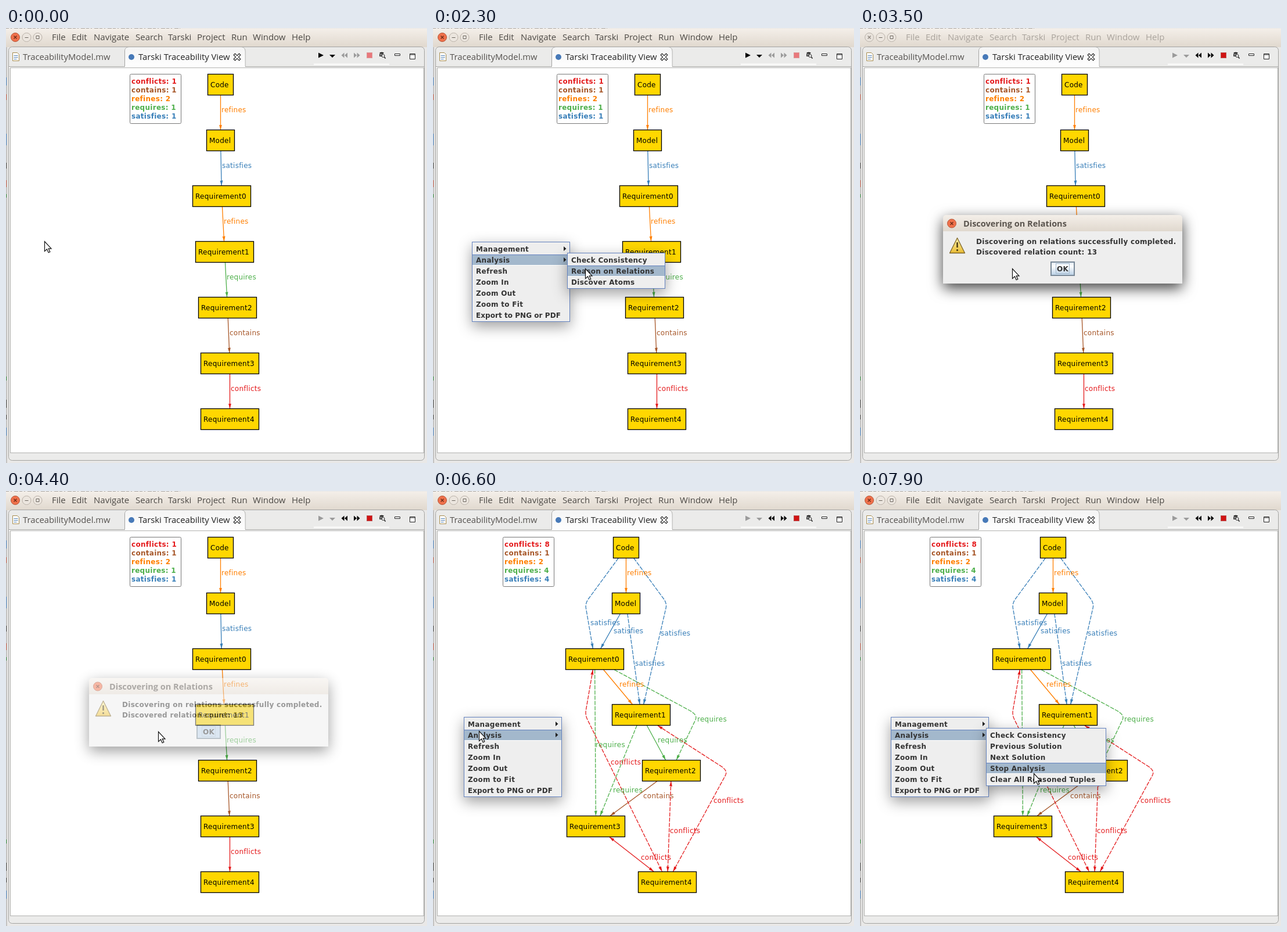
Animation, 725 px wide and 749 px high, one loop 8 s. Source, as an HTML page:

```html
<!DOCTYPE html>
<html lang="en">
<head>
<meta charset="utf-8">
<title>Traceability view</title>
<style>
html, body { margin: 0; width: 100%; height: 100%; overflow: hidden; background: #e9e8e7; }
svg { display: block; width: 725px; height: 749px; }
text { white-space: pre; }
.ui { font: 15px "Open Sans", sans-serif; fill: #4c4945; }
.tab { font: 14.8px "Open Sans", sans-serif; }
.title { font: bold 14.5px "Open Sans", sans-serif; fill: #5a544e; }
.label { font: 12px "DejaVu Sans", sans-serif; letter-spacing: .25px; }
.bold { font: bold 12px "DejaVu Sans", sans-serif; letter-spacing: .28px; fill: #333; }
.node { fill: #ffd700; stroke: #000; stroke-width: 1.3; }
.edge { fill: none; stroke-width: 1.3; stroke-linecap: round; }
.dash { stroke-dasharray: 6 3; }
.float { filter: drop-shadow(0 8px 12px rgba(0, 0, 0, .38)); }
.dialog { filter: drop-shadow(0 8px 12px rgba(0, 0, 0, .75)); }
.crisp { shape-rendering: crispEdges; }
.blur .ui { fill: #a9a39c; }
.blur .close { fill: #e9e3dc; stroke: #bab3ab; }
.blur .cross { stroke: #8c857d; }
.close { fill: #f0714b; stroke: #b5583c; }
.cross { stroke: #6b2b18; stroke-width: 1.3; }
.round { fill: #ece6df; stroke: #b9b1a8; }
.idle, .busy .live { fill: #9b9b9b; }
.live, .busy .idle { fill: #000; }
.stop { fill: #e8787c; stroke: #d99; }
.busy .stop { fill: #d01313; stroke: #b55; }
</style>
</head>
<body>
<svg id="stage" viewBox="0 0 725 749">
  <defs id="defs">
    <linearGradient id="bar" x2="0" y2="1"><stop stop-color="#f4efe9"/><stop offset="1" stop-color="#e0d8ce"/></linearGradient>
    <linearGradient id="item" x2="0" y2="1"><stop stop-color="#f4f4f4"/><stop offset="1" stop-color="#fff"/></linearGradient>
    <linearGradient id="metal" x2="0" y2="1"><stop stop-color="#dde8f3"/><stop offset=".3" stop-color="#fff"/><stop offset="1" stop-color="#b8cfe5"/></linearGradient>
    <linearGradient id="gold" x2="0" y2="1"><stop stop-color="#fff3a8"/><stop offset="1" stop-color="#e9bb33"/></linearGradient>
  </defs>

  <g id="frame">
    <path d="M0 .5H300" stroke="#a9a6a3" stroke-dasharray="5 3 2 4 7 2"/>
    <rect y="1" width="725" height="32" fill="url(#bar)"/>
    <circle class="close" cx="16" cy="16" r="7.5"/>
    <path class="cross" d="M13.5 13.5l5 5m0-5l-5 5"/>
    <circle class="round" cx="35.5" cy="16" r="7.5"/>
    <circle class="round" cx="54.5" cy="16" r="7.5"/>
    <path d="M32.5 16.5h6M52 13.5h5v5h-5z" fill="none" stroke="#69635c"/>
    <g id="menubar"></g>
  </g>

  <rect x="4.5" y="32.5" width="716" height="712" rx="6" fill="#ebebea" stroke="#a3a3a1"/>
  <path d="M5 66.5H204.5V40q0-7 7-7H405q7 0 7 7V66.5H720" fill="none" stroke="#a3a3a1"/>
  <path d="M205 69V40q0-7 7-7H405q6.5 0 6.5 7V69z" fill="url(#item)"/>
  <rect x="5" y="67" width="715" height="2" fill="#fff"/>
  <rect class="crisp" x="7.5" y="68.5" width="712" height="663" fill="#fff" stroke="#b1b1af"/>
  <path d="M530 62.5H660" stroke="#fff" stroke-width="2"/>
  <g class="crisp">
    <path d="M0 33V749" stroke="#c4c3c2" stroke-width="3"/>
    <path d="M.5 85v14M.5 182v20M.5 688v14" stroke="#5a94d0"/>
    <path d="M.5 114v10M.5 262v12" stroke="#d06a58"/>
    <path d="M.5 286v6M.5 600v7" stroke="#3f9b4c"/>
    <path d="M.5 232v10M.5 640v14M.5 666v8" stroke="#555"/>
  </g>

  <path d="M11.5 42.5h8l3 3v11h-11z" fill="#fff" stroke="#a58b4d"/>
  <path d="M13.5 47.5h7m-7 3h7m-7 3h5" stroke="#4f7fb5"/>
  <circle cx="216" cy="50" r="5" fill="#4779b8"/>
  <text class="tab" x="29" y="55" fill="#55524f">TraceabilityModel.mw</text>
  <text class="tab" x="228" y="55" fill="#222">Tarski Traceability View</text>
  <path d="M394.5 46.5l7 7m0-7l-7 7" stroke="#222" stroke-width="4.5" stroke-linecap="square"/>
  <path d="M394.5 46.5l7 7m0-7l-7 7" stroke="#fff" stroke-width="2.2" stroke-linecap="square"/>

  <g id="tools">
    <path class="live" d="M538 42.5l9 4.5-9 4.5zM557 46h10l-5 5z"/>
    <path class="idle" d="M582.5 42.5v9l-5-4.5zM588 42.5v9l-5-4.5zM599 42.5v9l5-4.5zM604.5 42.5v9l5-4.5z"/>
    <rect class="stop" x="621.5" y="42.5" width="9" height="9"/>
    <ellipse cx="647" cy="43" rx="3.5" ry="1.5" fill="#222"/>
    <path d="M643.5 44.5v4h5v-4" fill="#777" stroke="#333"/>
    <circle cx="649.5" cy="48" r="2.5" fill="#eee" stroke="#222"/>
    <path d="M651.5 50l2 2.5" stroke="#222" stroke-width="1.5"/>
    <path d="M669.5 44.5h9v3h-9zM695.5 44.5h9v9h-9zM695.5 46h9" fill="#fff" stroke="#222"/>
  </g>

  <g id="before"></g>
  <g id="after"></g>
  <g id="menus"></g>

  <g id="dialog">
    <path class="dialog" d="M143 440V328q0-6 6-6H549q6 0 6 6V440z" fill="#eee"/>
    <path d="M143 350V328q0-6 6-6H549q6 0 6 6v22z" fill="url(#bar)"/>
    <circle class="close" cx="158" cy="336.5" r="7.5"/>
    <path class="cross" d="M155.5 334l5 5m0-5l-5 5"/>
    <text class="title" x="178" y="342">Discovering on Relations</text>
    <path d="M167.5 361.5l13 26h-26z" fill="url(#gold)" stroke="#7d6428" stroke-width="1.3" stroke-linejoin="round"/>
    <path d="M167.5 369v9m0 3v3" stroke="#4a3a12" stroke-width="2.5"/>
    <text class="bold" x="200" y="372">Discovering on relations successfully completed.</text>
    <text class="bold" x="200" y="390">Discovered relation count: 13</text>
    <rect x="329" y="403" width="40" height="23" fill="url(#metal)" stroke="#7a8a99" stroke-width="2"/>
    <rect id="press" x="330" y="404" width="38" height="21" fill="#b8cfe5"/>
    <rect class="crisp" x="337.5" y="405.5" width="23" height="17" fill="none" stroke="#a3b8cc"/>
    <text class="bold" x="339" y="419">OK</text>
  </g>

  <path id="cursor" d="M.5.5V17.5L4.5 13.8 7.2 19.7 9.8 18.5 7.2 12.8H12z" fill="#fff" stroke="#111" stroke-width="1.2"/>
</svg>

<script>
const $ = id => document.getElementById(id);

function add(parent, tag, attrs, text) {
  const el = document.createElementNS('http://www.w3.org/2000/svg', tag);
  for (const k in attrs) el.setAttribute(k, attrs[k]);
  if (text) el.textContent = text;
  return parent.appendChild(el);
}
const show = (el, on) => { el.style.display = on ? '' : 'none'; };

const colors = {
  conflicts: '#e41a1c', contains: '#a65628', refines: '#ff7f00',
  requires: '#4daf4a', satisfies: '#377eb8'
};
for (const kind in colors) {
  const m = add($('defs'), 'marker', {
    id: kind, markerUnits: 'userSpaceOnUse', markerWidth: 9, markerHeight: 6,
    refX: 8.5, refY: 3, orient: 'auto-start-reverse'
  });
  add(m, 'path', { d: 'M0 .5L9 3 0 5.5z', fill: colors[kind] });
}

[['File', 79], ['Edit', 113], ['Navigate', 151], ['Search', 223], ['Tarski', 279],
 ['Project', 329], ['Run', 388], ['Window', 425], ['Help', 492]]
  .forEach(([name, x]) => add($('menubar'), 'text', { class: 'ui', x, y: 21 }, name));

// Nodes sit in rows 96px apart
const names = ['Code', 'Model', ...[0, 1, 2, 3, 4].map(i => 'Requirement' + i)];
const nodeWidth = i => [44, 48][i] || 100;
const rowY = i => 97.5 + 96 * i;

// Centre to centre, cut at the boxes; a bend lies in the row below the start
function route(lefts, from, to, bend) {
  const centre = i => [lefts[i] + .5 + nodeWidth(i) / 2, rowY(i)];
  const a = centre(from), b = centre(to), mid = [bend, rowY(from + 1)];
  const toward = (p, q, dy) => {
    const k = dy / Math.abs(q[1] - p[1]);
    return [p[0] + (q[0] - p[0]) * k, p[1] + (q[1] - p[1]) * k];
  };
  const start = toward(a, bend ? mid : b, 18.5), end = toward(b, bend ? mid : a, 18.5);
  const corner = bend ? `L${toward(mid, a, 8)}Q${mid} ${toward(mid, b, 8)}` : '';
  return `M${start}${corner}L${end}`;
}

// Edges: [kind, from, to, label x, label y, style, bend x]
function graph(g, lefts, legendX, counts, edges) {
  add(g, 'rect', { x: legendX + .5, y: 79.5, width: 88, height: 85, rx: 2, fill: '#fff', stroke: '#777' });
  Object.keys(colors).forEach((kind, i) => add(g, 'text', {
    class: 'bold', x: legendX + 3, y: 96 + 15 * i, style: 'fill:' + colors[kind]
  }, `${kind}: ${counts[i]}`));
  for (const [kind, from, to, , , style = '', bend] of edges) {
    const el = add(g, 'path', {
      d: route(lefts, from, to, bend), class: 'edge ' + style,
      stroke: colors[kind], 'marker-end': `url(#${kind})`
    });
    if (style.includes('both')) el.setAttribute('marker-start', `url(#${kind})`);
  }
  names.forEach((name, i) => {
    const x = lefts[i], y = rowY(i) - 18;
    add(g, 'rect', { class: 'node', x: x + .5, y, width: nodeWidth(i), height: 36 });
    add(g, 'text', { class: 'label', x: x + 5, y: y + 22.5 }, name);
  });
  for (const [kind, , , x, y] of edges)
    add(g, 'text', { class: 'label', x, y, fill: colors[kind] }, kind);
}

graph($('before'), [347, 345, 321, 326, 331, 335, 335], 213, [1, 1, 2, 1, 1], [
  ['refines', 0, 1, 371, 145],
  ['satisfies', 1, 2, 372, 241],
  ['refines', 2, 3, 375, 337],
  ['requires', 3, 4, 380, 433],
  ['contains', 4, 5, 385, 529],
  ['conflicts', 5, 6, 387, 625]
]);

graph($('after'), [310, 308, 228, 308, 360, 230, 353], 120, [8, 1, 2, 4, 4], [
  ['refines', 0, 1, 334, 145],
  ['satisfies', 0, 2, 271, 231, 'dash', 262],
  ['satisfies', 0, 3, 392, 249, 'dash', 403],
  ['satisfies', 1, 2, 311, 245],
  ['satisfies', 1, 3, 348, 301, 'dash'],
  ['refines', 2, 3, 321, 337],
  ['requires', 2, 4, 455, 397, 'dash', 456],
  ['requires', 2, 5, 280, 441, 'dash'],
  ['requires', 3, 4, 387, 433],
  ['requires', 3, 5, 310, 519, 'dash'],
  ['contains', 4, 5, 362, 529],
  ['conflicts', 2, 6, 306, 471, 'dash both', 262],
  ['conflicts', 3, 6, 483, 537, 'dash both', 508],
  ['conflicts', 4, 6, 408, 589, 'dash both'],
  ['conflicts', 5, 6, 358, 635, 'both']
]);

function menu(x, y, w, items, arrows = 0) {
  const g = add($('menus'), 'g', {}), h = items.length * 19 + 4;
  add(g, 'rect', { class: 'float', x, y, width: w + 1, height: h + 1, fill: '#eee' });
  add(g, 'rect', { class: 'crisp', x: x + .5, y: y + .5, width: w, height: h, fill: '#eee', stroke: '#6382bf' });
  const bar = add(g, 'g', { class: 'crisp' });
  add(bar, 'rect', { x: x + 1, width: w - 1, height: 19, fill: '#a3b8cc' });
  add(bar, 'rect', { x: x + 1, width: w - 1, height: 1, fill: '#6382bf' });
  add(bar, 'rect', { x: x + 1, y: 18, width: w - 1, height: 1, fill: '#fff' });
  items.forEach((item, i) => {
    const text = add(g, 'text', { class: 'bold', x: x + 7, y: y + 17 + 19 * i }, item);
    if (/PNG/.test(item)) text.style.letterSpacing = '.05px';
    if (i < arrows) add(g, 'path', { d: `M${x + 158} ${y + 8 + 19 * i}v8l4.5-4z`, fill: '#222' });
  });
  return (visible, row) => {
    show(g, visible);
    show(bar, row >= 0 && row < items.length);
    bar.setAttribute('transform', `translate(0 ${y + 3 + 19 * row})`);
  };
}

const mainItems = ['Management', 'Analysis', 'Refresh', 'Zoom In', 'Zoom Out', 'Zoom to Fit', 'Export to PNG or PDF'];
const popups = [
  { x: 67, y: 368, subX: 231, subW: 168, open: 300, sub: 1000, end: 3000,
    items: ['Check Consistency', 'Reason on Relations', 'Discover Atoms'] },
  { x: 53, y: 389, subX: 217, subW: 206, open: 6100, sub: 6800, end: 8000,
    items: ['Check Consistency', 'Previous Solution', 'Next Solution', 'Stop Analysis', 'Clear All Reasoned Tuples'] }
];
for (const p of popups) {
  p.main = menu(p.x, p.y, 168, mainItems, 2);
  p.child = menu(p.subX, p.y + 19, p.subW, p.items);
}

// Pointer stops: [ms, x, y]
const stops = [
  [0, 66, 367], [500, 66, 367], [800, 92, 395], [1400, 206, 396], [1700, 252, 396],
  [1800, 252, 396], [2300, 262, 414], [5100, 262, 414], [5800, 52, 388], [6300, 52, 388],
  [6600, 79, 413], [7200, 268, 416], [7400, 268, 416], [7900, 299, 486.5]
];
function pointer(t) {
  const i = Math.max(1, stops.findIndex(s => s[0] >= t));
  const [t0, x0, y0] = stops[i - 1], [t1, x1, y1] = stops[i];
  const k = (t - t0) / (t1 - t0);
  return [x0 + (x1 - x0) * k, y0 + (y1 - y0) * k];
}

function draw(now) {
  const t = Math.floor(now % 8000 / 100) * 100;
  const within = (a, b) => t >= a && t < b;
  const [x, y] = pointer(t);
  $('cursor').setAttribute('transform', `translate(${Math.round(x)} ${Math.floor(y)})`);

  for (const p of popups) {
    const inSub = t >= p.sub && x >= p.subX;
    p.main(within(p.open, p.end), inSub ? 1 : Math.floor((y - p.y - 3) / 19));
    p.child(within(p.sub, p.end), inSub ? Math.floor((y - p.y - 22) / 19) : -1);
  }

  show($('before'), t < 4500);
  show($('after'), t >= 4500);
  $('tools').classList.toggle('busy', t >= 3000);
  $('frame').classList.toggle('blur', within(3400, 4400));
  show($('dialog'), within(3400, 4500));
  $('dialog').style.opacity = within(3500, 4400) ? 1 : .5;
  show($('press'), t >= 4200);
  requestAnimationFrame(draw);
}
draw(performance.now());
</script>
</body>
</html>
```
